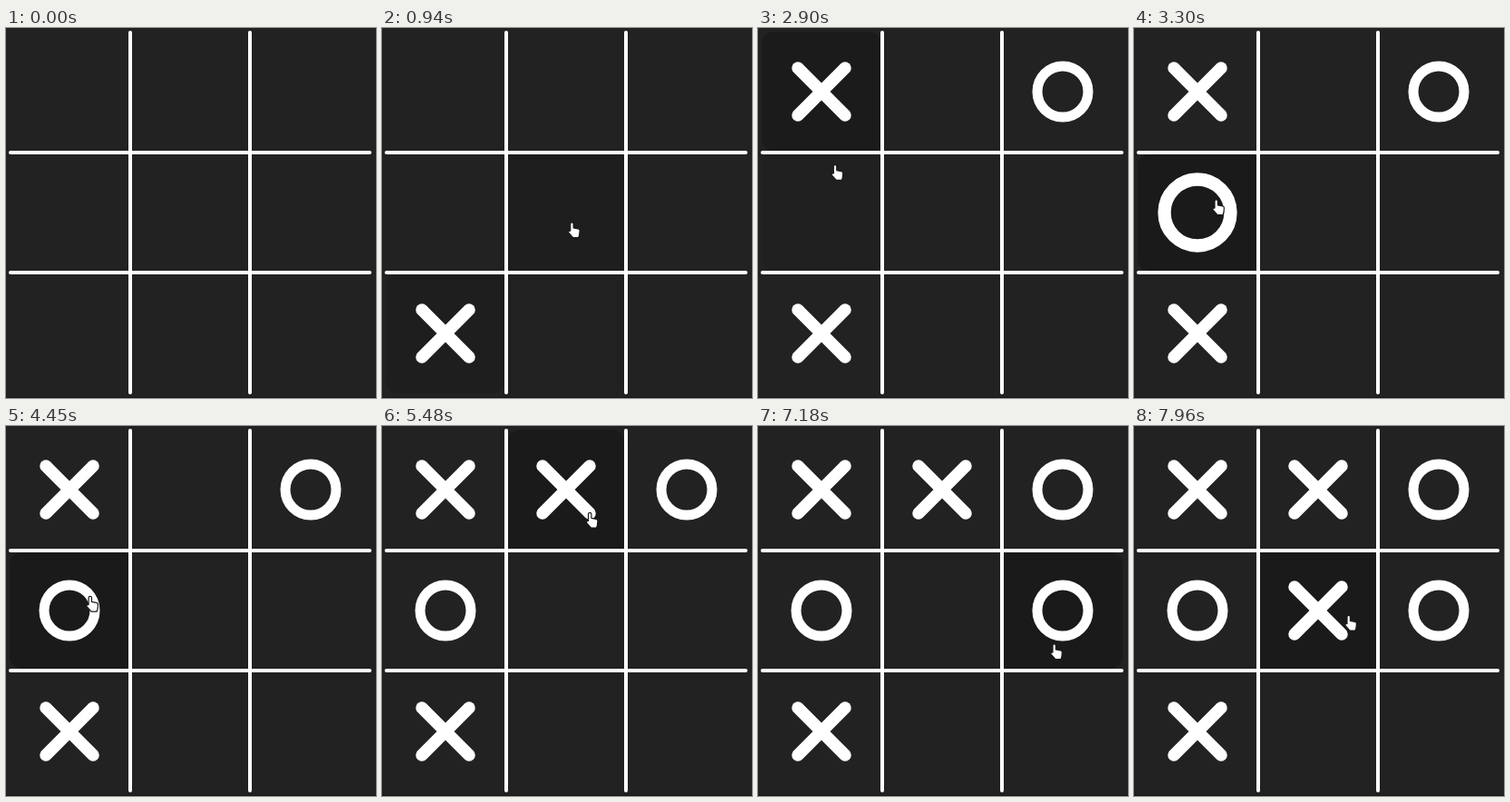
Recreate the animation shown at these times as an HTML page with a canvas. Size 408x407 px, loop 8000 ms.

```html
<!DOCTYPE html>
<html lang="en">
<head>
<meta charset="utf-8">
<title>Noughts and crosses</title>
<style>
html, body { margin: 0; width: 100%; height: 100%; overflow: hidden; background: #222; }
canvas { display: block; }
</style>
</head>
<body>
<canvas id="stage" width="408" height="407"></canvas>
<script>
const ctx = document.getElementById('stage').getContext('2d');
const LOOP = 8000;
const CENTERS = [70, 203, 336];
const CELL_STARTS = [4, 139, 271];
const CELL_ENDS = [135, 267, 402];
const POP_MS = 320;
const FADE_MS = 150;
const FADE_SAMPLES = 10;

const marks = [
  { shape: 'x', cell: 6, start: 470 },
  { shape: 'o', cell: 2, start: 1310 },
  { shape: 'x', cell: 0, start: 2400 },
  { shape: 'o', cell: 3, start: 3160 },
  { shape: 'x', cell: 1, start: 4660 },
  { shape: 'o', cell: 5, start: 6870 },
  { shape: 'x', cell: 4, start: 7620 }
];

// Each move runs from the previous stop; bend is an optional curve control point.
const pointerStart = [153, 372];
const pointerShown = 100;
const moves = [
  { from: 60, until: 290, to: [64, 348] },
  { from: 740, until: 1130, to: [333, 90] },
  { from: 1430, until: 1770, to: [69, 73], bend: [200, 134] },
  { from: 2680, until: 3040, to: [86, 188] },
  { from: 4430, until: 4720, to: [224, 93] },
  { from: 5340, until: 5480, to: [224.5, 94.5] },
  { from: 6480, until: 6870, to: [322, 239] },
  { from: 7450, until: 7680, to: [232, 207.5] }
];

const hand = new Path2D('M3 10V2.5a1.7 1.7 0 0 1 3.4 0V6.8l5.2 1q1.9.4 1.8 2.2l-.5 5-1 2.6H6L1 12q-.6-1.6 1-1.8z');

const clamp = v => Math.min(1, Math.max(0, v));
const smooth = v => v * v * (3 - 2 * v);

function pointerAt(t) {
  if (t < pointerShown) return null;
  let pos = pointerStart;
  for (const { from, until, to, bend } of moves) {
    if (t <= from) break;
    const u = smooth(clamp((t - from) / (until - from)));
    const start = pos;
    pos = to.map((end, i) => {
      const mid = bend ? bend[i] : (start[i] + end) / 2;
      return (1 - u) ** 2 * start[i] + 2 * u * (1 - u) * mid + u * u * end;
    });
  }
  return pos;
}

function cellUnder(pos) {
  const index = v => (v < 137 ? 0 : v < 269 ? 1 : 2);
  return index(pos[1] + 1) * 3 + index(pos[0] + 4.7);
}

// Averaging the recent pointer cells gives each highlight a linear fade.
function drawHover(t) {
  const amount = Array(9).fill(0);
  for (let i = 0; i < FADE_SAMPLES; i++) {
    const pos = pointerAt(t - (i / FADE_SAMPLES) * FADE_MS);
    if (pos) amount[cellUnder(pos)] += 1 / FADE_SAMPLES;
  }
  amount.forEach((alpha, cell) => {
    if (!alpha) return;
    const col = cell % 3, row = Math.floor(cell / 3);
    const x = CELL_STARTS[col], y = CELL_STARTS[row];
    const radius = (c, r) => (col === c || row === r ? 13 : 0);
    ctx.fillStyle = `rgba(26, 26, 26, ${alpha})`;
    ctx.beginPath();
    ctx.roundRect(x, y, CELL_ENDS[col] - x, CELL_ENDS[row] - y,
      [radius(0, 0), radius(2, 0), radius(2, 2), radius(0, 2)]);
    ctx.fill();
  });
}

function line(x1, y1, x2, y2) {
  ctx.beginPath();
  ctx.moveTo(x1, y1);
  ctx.lineTo(x2, y2);
  ctx.stroke();
}

function drawGrid() {
  ctx.strokeStyle = '#fff';
  ctx.lineWidth = 4;
  for (const p of [137, 269]) {
    line(p, 5, p, 401);
    line(5, p, 401, p);
  }
}

function popScale(u, peak) {
  const top = 0.35;
  if (u < top) return peak * Math.sin((u / top) * Math.PI / 2);
  return peak + (1 - peak) * smooth((u - top) / (1 - top));
}

function drawMark({ shape, cell, start }, t) {
  if (t <= start) return;
  const scale = popScale(clamp((t - start) / POP_MS), shape === 'o' ? 1.32 : 1.26);
  ctx.save();
  ctx.translate(CENTERS[cell % 3], CENTERS[Math.floor(cell / 3)]);
  ctx.scale(scale, scale);
  ctx.strokeStyle = '#fff';
  if (shape === 'x') {
    ctx.lineWidth = 13.5;
    line(-26, -26, 26, 26);
    line(26, -26, -26, 26);
  } else {
    ctx.lineWidth = 11;
    ctx.beginPath();
    ctx.arc(0, 0, 28, 0, Math.PI * 2);
    ctx.stroke();
  }
  ctx.restore();
}

function drawPointer(t) {
  const pos = pointerAt(t);
  if (!pos) return;
  ctx.save();
  ctx.translate(...pos);
  ctx.lineWidth = 1.2;
  ctx.strokeStyle = '#1a1a1a';
  ctx.fillStyle = '#fff';
  ctx.fill(hand);
  ctx.stroke(hand);
  ctx.restore();
}

function draw(t) {
  ctx.fillStyle = '#222';
  ctx.fillRect(0, 0, 408, 407);
  ctx.fillStyle = '#161616';
  ctx.fillRect(0, 406, 408, 1);
  ctx.lineCap = 'round';
  ctx.lineJoin = 'round';
  drawHover(t);
  drawGrid();
  marks.forEach(mark => drawMark(mark, t));
  drawPointer(t);
}

const begin = performance.now();
function tick() {
  draw((performance.now() - begin) % LOOP);
  requestAnimationFrame(tick);
}
tick();
</script>
</body>
</html>
```
